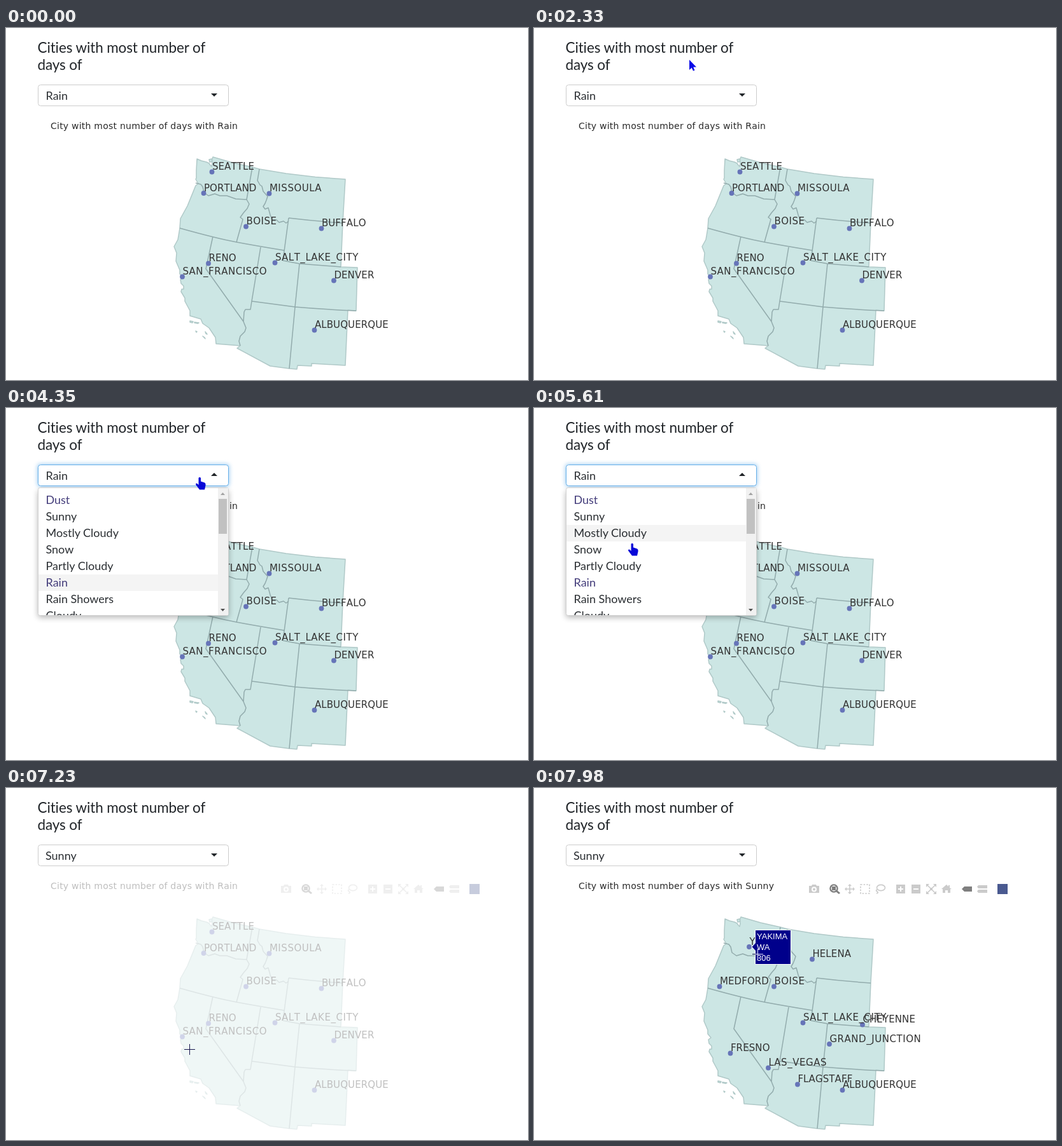
Write an HTML page that moves like this. It is 820x554 px and loops after 8 s.

```html
<!DOCTYPE html>
<html lang="en">
<head>
<meta charset="utf-8">
<title>Weather map</title>
<style>
  html, body { margin: 0; width: 100%; height: 100%; overflow: hidden; background: #fff; }
  svg { display: block; width: 820px; height: 554px; }
  text { font-kerning: none; white-space: pre; }
  .lato { font-family: Lato, sans-serif; font-size: 18px; fill: #2b2f33; font-kerning: auto; font-variant-ligatures: none; }
  .head { font-size: 22.5px; letter-spacing: -.13px; fill: #212529; }
  .plot text { font-family: "DejaVu Sans", Verdana, sans-serif; font-size: 15px; letter-spacing: .1px; fill: #333; }
  .plot .title { font-size: 14px; letter-spacing: .23px; fill: #2a2a2a; }
  .plot .wide { letter-spacing: .54px; }
  .plot .tip text { font: 13px "Liberation Sans", Arial, sans-serif; letter-spacing: 0; fill: #fff; }
  .land { fill: #cce6e4; stroke: #b0c9c8; stroke-width: 1.5; stroke-linejoin: round; }
  .border { fill: none; stroke: #92abac; stroke-width: 1.5; stroke-linejoin: round; }
  .bar { fill: #cbcbcb; }
  .bar .on { fill: #7f7f7f; }
  .bar .line { fill: none; stroke: #cbcbcb; stroke-width: 1.6; }
  .bar .cut { fill: none; stroke: #fff; stroke-width: 2; }
</style>
</head>
<body>
<svg viewBox="0 0 820 554">
  <defs>
    <clipPath id="menuClip"><rect x="51" y="126" width="298" height="200"/></clipPath>
    <clipPath id="tipClip"><rect x="348" y="224" width="55" height="53"/></clipPath>
    <filter id="soft" x="-20%" y="-20%" width="140%" height="150%"><feGaussianBlur stdDeviation="5"/></filter>
    <filter id="glowBlur" x="-10%" y="-50%" width="120%" height="200%"><feGaussianBlur stdDeviation="3"/></filter>
  </defs>

  <text class="lato head" x="49.5" y="38.5">Cities with most number of</text>
  <text class="lato head" x="49.5" y="65.5">days of</text>

  <g class="plot" id="plot">
    <text class="title" id="title" x="70" y="159"></text>
    <path class="land" d="M300 206L307 209 315 211 319 213 321 216 323 218 324 213 323 209 325 203
      356 212 387 219 398 222 440 229 486 234.5 533 238 529 306 526 376 552 377 550 445 537 444 533 531
      480 528 480 532 458 531 457 537 445 536 415 532 363 504 368 500 330 497 329 487 319 472 309 465
      306 458 289 453 289 445 281 430 281 425 275 415 276 411 279 411 279 406 275 402 274 396 278 393
      273 387 273 381 267 367 268 354 264 344 270 333 273 315 274 300 285 280 298 248 302 245 298 238
      299 236 299 224Z"/>
    <path class="land" d="M319 207l4 -1 1 4 -4 1ZM289 461l5 1 -1 2 -4 -1ZM296 463l7 1 -2 1 -5 -1ZM298 477l2 1 -1 1ZM309 485l3 2 1 2ZM313 478l3 4 -2 -1Z"/>
    <path class="border" d="M298 244L306 246 309 250 311 259 318 264 328 261 336 264 347 264 361 269 378 270
      M387 219L378 270 382 277 379 284 373 291 368 298 372 301 371 305 362 337
      M398 222L395 240 399 247 402 249 404 257 411 265 409 271 407 276 404 281 407 285 412 283 415 294 418 302
      425 302 429 306 436 304 440 307 444 304"/>
    <path class="border" d="M273 315Q330 331 362 337T437 350M444 299L435 366 461 371 526 376M444 299Q486 304 529 307
      M325 328L314 379 373 462M400 345L386 430 384 443 376 443 374 447 373 462 377 472 375 478 368 485 366 493 368 500
      M386 430L454 439Q500 443 550 445M461 371L454 439 445 536"/>
    <g id="cities"></g>
    <g class="bar" id="bar">
      <path d="M432 154h4l1 -2h6l1 2h4v11h-16Z"/>
      <circle class="cut" cx="440" cy="159.500" r="3"/>
      <circle cx="471" cy="158" r="5.6" fill="none" stroke="#7f7f7f" stroke-width="2.4"/>
      <path class="on" d="M468 155h6v6h-6ZM474 163l2 -2 5 4 -2 2Z"/>
      <path class="line" d="M496 153v12M490 159h12"/>
      <path d="M496 151l3 3h-6ZM496 167l3 -3h-6ZM488 159l3 -3v6ZM504 159l-3 -3v6Z"/>
      <rect class="line" x="513" y="152" width="14" height="14" stroke-dasharray="2.6 2"/>
      <ellipse class="line" cx="545" cy="157" rx="6.5" ry="4.6"/>
      <path class="line" d="M539 160q-3 1 0 3t-1 3"/>
      <path d="M569 152h14v14h-14ZM593 152h14v14h-14Z"/>
      <path class="cut" d="M576 155v8M572 159h8M596 159h8"/>
      <path class="line" d="M618 153l12 12M630 153l-12 12"/>
      <path d="M616 151h5l-5 5ZM632 151v5l-5 -5ZM616 167v-5l5 5ZM632 167h-5l5 -5ZM622 157h4v4h-4Z"/>
      <path d="M640 159l8 -7 3 3v-2h2v4l3 2h-2v6h-4v-4h-4v4h-4v-6Z"/>
      <path class="on" d="M672 159l4 -4h12v8h-12Z"/>
      <path d="M696 155.500l2 -2.500h14v5h-14ZM696 162.500l2 -2.500h14v5h-14Z"/>
      <rect x="728" y="151" width="16" height="16" fill="#4a5a90"/>
    </g>
    <g class="tip" id="tip">
      <path d="M342 250l5.500 -6v-20.500h56v54h-56v-21.500Z" fill="#00008b" stroke="#fff"/>
      <text x="350" y="238">YAKIMA</text>
      <text x="350" y="255">WA</text>
      <text x="350" y="272">306</text>
    </g>
  </g>

  <rect id="glow" x="49" y="88" width="302" height="36" rx="5" fill="#66afe9" filter="url(#glowBlur)"/>
  <rect id="box" x="50.5" y="89.500" width="299" height="33" rx="4" fill="#fff"/>
  <text class="lato" id="value" y="113"></text>
  <path id="arrowMark" fill="#212529"/>
  <path id="blink" d="M98.500 96v20" stroke="#222"/>

  <g id="menu">
    <rect x="50" y="130" width="300" height="200" rx="4" filter="url(#soft)" opacity=".28"/>
    <rect x="50.5" y="125.500" width="299" height="201" rx="3" fill="#fff" stroke="#d0d0d0"/>
    <g clip-path="url(#menuClip)">
      <rect id="hover" x="51" width="282" height="26" fill="#f4f4f4"/>
      <g id="options"></g>
      <path d="M333 126h16v200h-16Z" fill="#f1f1f1"/>
      <path d="M334 143h13v55h-13Z" fill="#c1c1c1"/>
      <path d="M337 137h7l-3.500 -4Z" fill="#a3a3a3"/>
      <path d="M337 316h7l-3.500 4Z" fill="#505050"/>
    </g>
  </g>

  <g id="arrow"><path d="M0 0V16L3.700 12.600 6 17.500 8.500 16.400 6.200 11.500H11Z" fill="#0808e8"/></g>
  <g id="hand"><path d="M-1.500 1Q0 -1 2 1V6.500L8 8.500Q10 9.500 9.500 13L8 19.500H0L-6 11.500Q-6 8.500 -3.500 10L-1.500 12Z" fill="#0808d8"/></g>
  <g id="cross"><path d="M.5 -8v17M-8 .5h17" stroke="#15154d" fill="none"/></g>
  <g clip-path="url(#tipClip)"><g id="crossLight"><path d="M.5 -8v17M-8 .5h17" stroke="#e8e8ff" fill="none"/></g></g>
</svg>

<script>
const LOOP = 8000;
const $ = id => document.getElementById(id);
const clamp = v => Math.min(1, Math.max(0, v));
const smooth = v => { v = clamp(v); return v * v * (3 - 2 * v); };
const show = (id, on) => { $(id).style.display = on ? '' : 'none'; };

// Name, marker x, marker y
const rain = [
  ['SEATTLE', 323.5, 226.5], ['PORTLAND', 310.5, 260], ['MISSOULA', 413.5, 260.5], ['BOISE', 377, 312.5],
  ['BUFFALO', 495.5, 315.5], ['SALT_LAKE_CITY', 422.5, 369.5], ['RENO', 318, 370.5],
  ['SAN_FRANCISCO', 277, 391.5], ['DENVER', 515, 397.5], ['ALBUQUERQUE', 484.5, 475.5]
];
const sunny = [
  ['YAKIMA', 338, 250], ['HELENA', 437, 269.5], ['MEDFORD', 291.5, 312.5], rain[3], rain[5],
  ['CHEYENNE', 516, 372.5], ['GRAND_JUNCTION', 464, 403], ['FRESNO', 308.5, 417.5],
  ['LAS_VEGAS', 368, 440.5], ['FLAGSTAFF', 414, 466.5], rain[9]
];
const cityMarkup = list =>
  list.map(([, x, y]) => `<circle cx="${x}" cy="${y}" r="3.900" fill="#6674b8"/>`).join('') +
  list.map(([name, x, y]) =>
    `<text class="${/[_I]/.test(name) ? 'wide' : ''}" x="${x + .4}" y="${Math.round(y - 3.5)}">${name}</text>`).join('');

const choices = ['Dust', 'Sunny', 'Mostly Cloudy', 'Snow', 'Partly Cloudy', 'Rain', 'Rain Showers', 'Cloudy'];
$('options').innerHTML = choices.map((name, i) =>
  `<text class="lato" x="62.500" y="${151 + 26 * i}"${i % 5 ? '' : ' style="fill:#433c7a"'}>${name}</text>`).join('');

// Pointer moves: number of steps, then waypoints of time, x, y
const moves = [
  [6, [450, 88, 541], [580, 52, 510], [780, 6, 464]],
  [12, [1510, 8, 122], [1900, 140, 75], [2270, 261, 42]],
  [12, [2330, 244, 50], [2700, 80, 98], [3070, 235, 111]],
  [3, [3140, 262, 110], [3215, 286, 109], [3290, 304, 109]],
  [12, [5210, 288, 120], [5415, 222, 165], [5619, 154, 213], [5790, 115, 200], [5960, 98, 168]],
  [4, [6220, 109, 237], [6290, 109, 314], [6360, 128, 400], [6430, 175, 422]],
  [12, [6620, 150, 385], [6756, 109, 314], [6980, 187, 345], [7234, 288, 411], [7370, 316, 413]],
  [9, [7440, 320, 413], [7700, 338, 345], [7980, 351, 261]]
];

function spline(p, t) {
  let i = 0;
  while (i < p.length - 2 && t > p[i + 1][0]) i++;
  const b = p[i], c = p[i + 1], a = p[i - 1] || b, d = p[i + 2] || c;
  const u = clamp((t - b[0]) / (c[0] - b[0]));
  const axis = k => b[k] + .5 * u * (c[k] - a[k] +
    u * (2 * a[k] - 5 * b[k] + 4 * c[k] - d[k] + u * (3 * (b[k] - c[k]) + d[k] - a[k])));
  return [axis(1), axis(2)];
}

function pointer(t) {
  if (t < 450 || (t >= 780 && t < 1510)) return null;
  const [n, ...pts] = moves.filter(m => t >= m[1][0]).pop();
  const start = pts[0][0], step = (pts[pts.length - 1][0] - start) / (n - 1);
  const k = Math.min(n - 1, Math.floor((t - start) / step + .3));
  return spline(pts, start + k * step);
}

let shown;
function setData(weather) {
  if (weather === shown) return;
  shown = weather;
  $('title').textContent = 'City with most number of days with ' + weather;
  $('cities').innerHTML = cityMarkup(weather === 'Rain' ? rain : sunny);
}

function drawPointer(t, open) {
  const p = pointer(t);
  const onBox = p && p[0] > 50 && p[0] < 350 && p[1] > 89 && p[1] < (open ? 326 : 123);
  const kind = !p ? '' : t >= 6220 ? 'cross' : onBox ? 'hand' : 'arrow';
  for (const id of ['arrow', 'hand', 'cross']) show(id, id === kind);
  show('crossLight', t >= 7910);
  if (p) {
    const move = `translate(${Math.round(p[0])} ${Math.round(p[1])})`;
    $(kind).setAttribute('transform', move);
    $('crossLight').setAttribute('transform', move);
  }
  const row = t < 5280 || !p ? 5 : Math.max(0, Math.floor((p[1] - 136) / 26));
  $('hover').setAttribute('y', 132 + 26 * row);
}

function render(t) {
  const open = t >= 3680 && t < 6220;
  const picked = t >= 6220, fresh = t >= 7300;

  setData(fresh ? 'Sunny' : 'Rain');
  $('plot').style.opacity = fresh ? 1 : 1 - .7 * smooth((t - 6695) / 250);
  $('bar').style.opacity = fresh ? smooth((t - 7420) / 300) : smooth((t - 6200) / 230);
  show('tip', t >= 7910);

  show('menu', open);
  show('glow', open);
  $('glow').style.opacity = .6 * clamp((t - 3650) / 170);
  $('box').setAttribute('stroke', open ? '#66afe9' : '#ccc');
  $('value').textContent = picked ? 'Sunny' : 'Rain';
  $('value').setAttribute('x', picked ? 62 : 62.5);
  $('arrowMark').setAttribute('d', open ? 'M322 107h10l-5 -5Z' : 'M322 103h10l-5 5Z');
  show('blink', open && t >= 3820 && t < 5410 && Math.floor((t - 3820) / 530) % 2 === 0);

  drawPointer(t, open);
}

const begin = performance.now();
function tick() {
  render((performance.now() - begin) % LOOP);
  requestAnimationFrame(tick);
}
tick();
</script>
</body>
</html>
```
